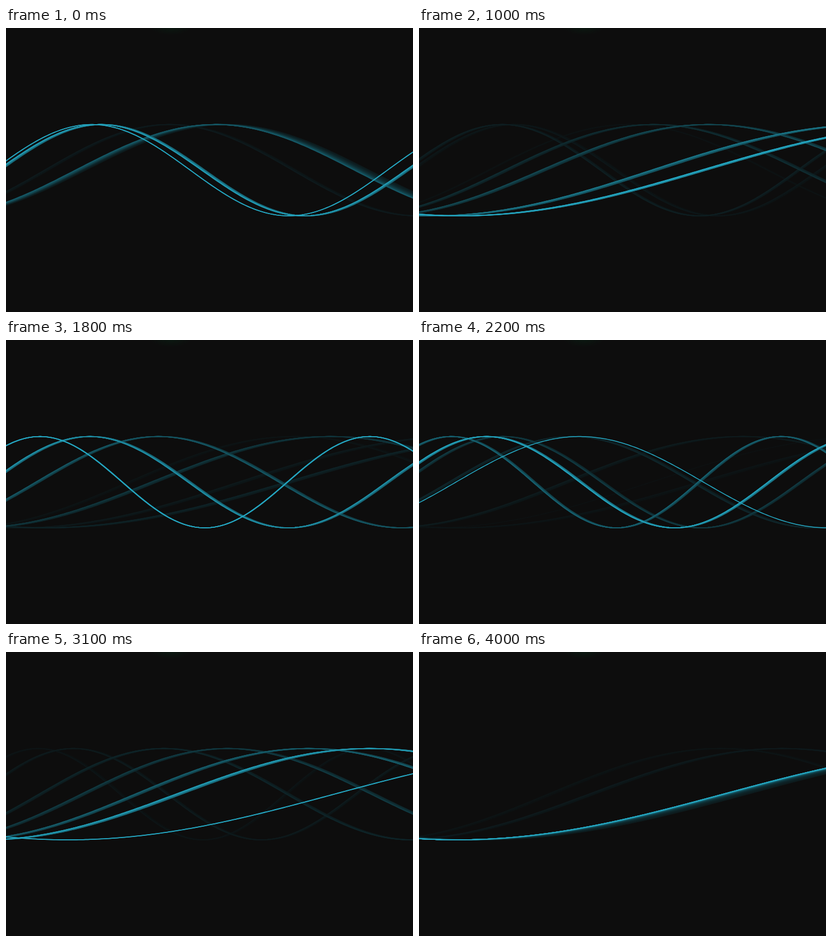
Animation of 716 by 499 pixels, one loop 4100 ms. Source, as an HTML page with a canvas:

```html
<!DOCTYPE html>
<html>
<head>
<meta charset="utf-8">
<style>
  html, body { margin: 0; overflow: hidden; background: #0d0d0d; }
  canvas { display: block; }
</style>
</head>
<body>
<canvas id="stage" width="716" height="499"></canvas>
<script>
const ctx = document.getElementById('stage').getContext('2d');
const W = 716, H = 499, LOOP = 4100, TICK = 100;
const STEP = 1000 / 60, LIFE = 1350;
const MIDDLE = 249.8, AMPLITUDE = 80.2, ORIGIN = -385;

// Radians per pixel; the wave takes the next value every HOLD ms and keeps the last.
const frequencies = [
  0.0072, 0.0063, 0.00635, 0.0064, 0.00875, 0.00906, 0.00604, 0.00538, 0.00406,
  0.00367, 0.00502, 0.00734, 0.009, 0.01083, 0.00949, 0.00721, 0.00616, 0.0052,
  0.00465, 0.00335
];
const HOLD = 222, FIRST = -30 - 5 * HOLD;

// During a hold the wave glides left, slowing down.
function waveAt(time) {
  const index = Math.min(Math.floor((time - FIRST) / HOLD), frequencies.length - 1);
  const start = FIRST + index * HOLD;
  const glide = 0.19 * (1 - Math.exp((start - time) / 600));
  const k = frequencies[index];
  return x => MIDDLE - AMPLITUDE * Math.sin(k * (x - ORIGIN) - 3.29 + 0.00002 * start + glide);
}

function trailColor(age) {
  const fade = (amount, tau) => Math.round(13 + amount * Math.exp(-age / tau));
  return `rgb(${fade(24, 250)},${fade(155, 370)},${fade(182, 370)})`;
}

function drawWave(time, age) {
  const y = waveAt(time);
  ctx.beginPath();
  for (let x = -4; x <= W + 4; x += 4) ctx.lineTo(x, y(x));
  ctx.strokeStyle = trailColor(age);
  ctx.stroke();
}

function drawGlow() {
  ctx.save();
  ctx.translate(290, -2);
  ctx.scale(1, 0.4);
  const glow = ctx.createRadialGradient(0, 0, 0, 0, 0, 36);
  glow.addColorStop(0, 'rgba(10,28,18,0.8)');
  glow.addColorStop(1, 'rgba(10,28,18,0)');
  ctx.fillStyle = glow;
  ctx.fillRect(-36, -36, 72, 72);
  ctx.restore();
}

function draw(now) {
  ctx.fillStyle = '#0d0d0d';
  ctx.fillRect(0, 0, W, H);
  drawGlow();
  ctx.lineWidth = 1.5;
  for (let age = LIFE; age > -1; age -= STEP) {
    if (now - age >= FIRST) drawWave(now - age, age);
  }
}

const begin = performance.now();
let shown = -1;
function tick() {
  const elapsed = (performance.now() - begin) % LOOP;
  const now = Math.floor(elapsed / TICK) * TICK;
  if (now !== shown) draw(shown = now);
  requestAnimationFrame(tick);
}
tick();
</script>
</body>
</html>
```
